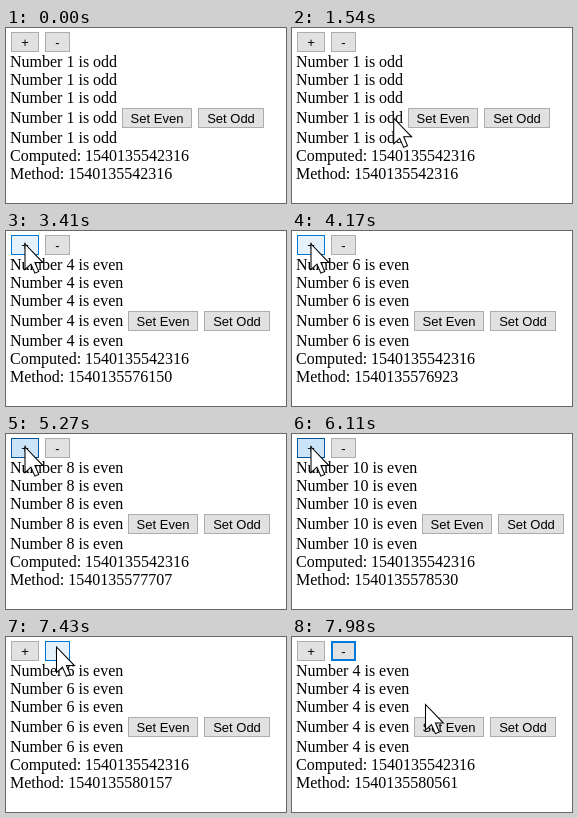
An HTML page that plays this animation: 280 by 175 pixels, repeating every 8000 ms.

```html
<!DOCTYPE html>
<html lang="en">
<head>
<meta charset="utf-8">
<title>Odd or even counter</title>
<style>
  html, body { margin: 0; width: 100%; height: 100%; overflow: hidden; background: #fff; }
  svg { display: block; width: 280px; height: 175px; }
  text { font: 16px "Liberation Serif", "Times New Roman", serif; white-space: pre; }
  .btn text { font: 13px "Liberation Sans", Arial, sans-serif; text-anchor: middle; }
  .btn rect { fill: #e1e1e1; stroke: #adadad; }
  .btn.focus rect { stroke: #0078d7; }
  .btn.hover rect { fill: #e5f1fb; stroke: #0078d7; }
  .btn.active rect { fill: #cce4f7; stroke: #005499; }
</style>
</head>
<body>
<svg viewBox="0 0 280 175">
  <g id="plus" class="btn"><rect x="5.5" y="4.5" width="27" height="19"/><text x="19" y="19">+</text></g>
  <g id="minus" class="btn"><rect x="39.5" y="4.5" width="24" height="19"/><text x="51.5" y="19">-</text></g>
  <text class="num" x="4" y="39"></text>
  <text class="num" x="4" y="57"></text>
  <text class="num" x="4" y="75"></text>
  <text class="num" x="4" y="95"></text>
  <g id="setters">
    <g class="btn"><rect x=".5" y="80.5" width="69" height="19"/><text x="35" y="95">Set Even</text></g>
    <g class="btn"><rect x="76.5" y="80.5" width="65" height="19"/><text x="109" y="95">Set Odd</text></g>
  </g>
  <text class="num" x="4" y="115"></text>
  <text x="4" y="133">Computed: 1540135542316</text>
  <text id="method" x="4" y="151"></text>
  <path id="cursor" d="M0 0V16L3.7 12.6L6.2 18.2L8.6 17.2L6.2 11.6H11.2Z" fill="#fff" stroke="#000" stroke-width=".65"/>
</svg>
<script>
const LOOP = 8000;
const START_STAMP = 1540135542316;
const STAMP_BASE = 1540135500000;
const $ = id => document.getElementById(id);

// press time, release time, timestamp offset at release
const plusClicks = [
  [2530, 2610, 75294], [2930, 3000, 75740], [3330, 3410, 76150], [3710, 3790, 76532],
  [4100, 4170, 76923], [4570, 4650, 77396], [4880, 4950, 77707], [5270, 5420, 78148],
  [5730, 5810, 78530], [6110, 6260, 78984]
];
const minusClicks = [
  [6730, 6810, 79529], [6890, 6970, 79693], [7050, 7130, 79851], [7200, 7280, 80004],
  [7430, 7430, 80157], [7600, 7680, 80405], [7750, 7830, 80561]
];
const clicks = [
  ...plusClicks.map(c => ["plus", 1, ...c]),
  ...minusClicks.map(c => ["minus", -1, ...c])
];

// start, end, step count, from, to
const moves = [
  [1310, 1920, 9, [140, 126], [19, 13]],
  [6430, 6580, 3, [27, 12], [50.5, 10]],
  [7900, 7980, 2, [92, 38], [133.5, 67.5]]
];

function cursorAt(t) {
  const move = moves.filter(m => t >= m[0]).pop();
  if (!move) return null;
  const [start, end, steps, from, to] = move;
  const p = Math.min(1, Math.floor((t - start) / (end - start) * (steps - 1) + 1e-6) / (steps - 1));
  const ease = p * p * (3 - 2 * p);
  return from.map((v, i) => v + (to[i] - v) * ease);
}

function isOver(id, pos) {
  if (!pos) return false;
  const [left, right] = id === "plus" ? [5, 33] : [39, 64];
  return pos[0] >= left && pos[0] < right && pos[1] >= 4 && pos[1] < 24;
}

function styleButton(id, pos, focused, pressed) {
  const hover = isOver(id, pos);
  const focus = focused === id && !hover;
  const left = id === "plus" ? 5 : 39;
  const width = id === "plus" ? 28 : 25;
  const line = focus ? 2 : 1;
  const rect = $(id).querySelector("rect");
  const box = { x: left + line / 2, y: 4 + line / 2, width: width - line, height: 20 - line, "stroke-width": line };
  for (const key in box) rect.setAttribute(key, box[key]);
  $(id).setAttribute("class", "btn" + (hover ? " hover" : "") + (focus ? " focus" : "") + (pressed === id ? " active" : ""));
}

function render(t) {
  let n = 1, stamp = START_STAMP, focused = null, pressed = null;
  for (const [id, delta, down, up, offset] of clicks) {
    if (t < down) break;
    focused = id;
    if (t < up) { pressed = id; break; }
    n += delta;
    stamp = STAMP_BASE + offset;
  }
  const even = n % 2 === 0;
  const label = `Number ${n} is ${even ? "even" : "odd"}`;
  document.querySelectorAll(".num").forEach(el => el.textContent = label);
  $("method").textContent = "Method: " + stamp;
  $("setters").setAttribute("transform", `translate(${(even ? 122 : 116) + (n > 9 ? 8 : 0)} 0)`);

  const pos = cursorAt(t);
  styleButton("plus", pos, focused, pressed);
  styleButton("minus", pos, focused, pressed);
  $("cursor").style.display = pos ? "" : "none";
  if (pos) $("cursor").setAttribute("transform", `translate(${pos}) scale(1.6)`);
}

function tick() {
  render(performance.now() % LOOP);
  requestAnimationFrame(tick);
}
tick();
</script>
</body>
</html>
```
